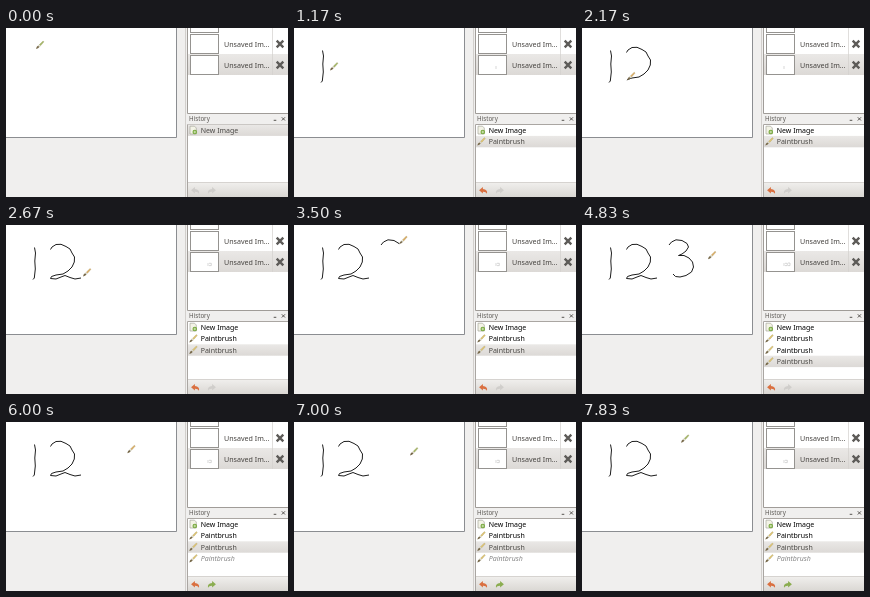
Recreate the animation shown at these times as an HTML page. Size 282 by 169 pixels, loop 8000 ms.

```html
<!DOCTYPE html>
<html lang="en">
<head>
<meta charset="utf-8">
<title>Paint history</title>
<style>
  html, body { margin: 0; width: 100%; height: 100%; overflow: hidden; background: #f0efee; }
  svg { display: block; width: 100%; height: 100%; }
  text { font-family: "Noto Sans", "Open Sans", sans-serif; font-size: 7px; font-weight: 500; }
  .stroke { fill: none; stroke: #1c1c1c; stroke-width: 1; stroke-linejoin: round; }
  .mini { fill: none; stroke: #bdbdbd; stroke-width: .6; }
  .title { font-size: 6.2px; fill: #5c5955; }
  .file { font-size: 7.1px; fill: #45423f; }
  .thumb { fill: #fff; stroke: #959390; stroke-width: 1; }
  .cross { stroke: #5d5b58; stroke-width: 2.4; fill: none; }
  .current { fill: #4a4845; }
  .undone { font-style: italic; fill: #878787; }
</style>
</head>
<body>
<svg viewBox="0 0 282 169">
  <defs>
    <linearGradient id="sel" x2="0" y2="1">
      <stop stop-color="#eae8e6"/><stop offset="1" stop-color="#dcd9d6"/>
    </linearGradient>
    <linearGradient id="bar" x2="0" y2="1">
      <stop stop-color="#f1f0ee"/><stop offset="1" stop-color="#dad7d3"/>
    </linearGradient>
    <g id="brush">
      <path d="M3.2 -4.2L7 -8L8 -7.2L4.5 -3.2Z" fill="currentColor" stroke="#99916a" stroke-width=".3"/>
      <path d="M2.5 -4.2L4.5 -2.7L3.4 -1.7L1.8 -3.3Z" fill="#d8d6c6"/>
      <path d="M0 0Q.6 -2.6 2 -3.2L3.4 -2Q2.4 -.3 0 0Z" fill="#77694a"/>
    </g>
    <path id="arrow" d="M-4.4 -.8L-.6 -4V-2.1Q4.4 -1.8 3.5 2.8Q2.5 .6 -.6 .7V2.5Z"/>
    <path id="cross" class="cross" d="M-3.3 -3.3L3.3 3.3M3.3 -3.3L-3.3 3.3"/>
  </defs>

  <rect width="282" height="169" fill="#f0efee"/>
  <rect width="170" height="109" fill="#fff"/>
  <path d="M0 109.5H170.5V0" fill="none" stroke="#8b8d91"/>

  <path d="M179.5 0V169" stroke="#d2cfcc"/>
  <rect x="181" width="101" height="85" fill="#fff"/>
  <rect x="181" y="26" width="101" height="21" fill="url(#sel)"/>
  <path d="M181.5 0V85.5H282" fill="none" stroke="#a09c98"/>
  <path d="M266.5 0V47" stroke="#d3d0cd" stroke-width=".7"/>
  <rect class="thumb" x="184.5" y="-15.5" width="28" height="20"/>
  <rect class="thumb" x="184.5" y="6.5" width="28" height="19"/>
  <rect class="thumb" x="184.5" y="27.5" width="28" height="19"/>
  <text class="file" x="218" y="18.5">Unsaved Im…</text>
  <text class="file" x="218" y="39.5">Unsaved Im…</text>
  <use href="#cross" x="274" y="16"/>
  <use href="#cross" x="274" y="37"/>
  <path class="mini" d="M202 38V41"/>
  <path class="mini" d="M203 38.3H205.3V40.6H203"/>
  <path class="mini" d="M206 38H208V40.6H206"/>

  <text class="title" x="183" y="93.2">History</text>
  <path d="M267.7 92.3H270.3" stroke="#56534f"/>
  <path d="M275.8 89.3L279 92.5M279 89.3L275.8 92.5" stroke="#56534f"/>
  <rect x="181" y="96" width="101" height="58" fill="#fff"/>
  <rect x="181" y="154" width="101" height="15" fill="url(#bar)"/>
  <path d="M282 96.5H181.5V169" fill="none" stroke="#aaa6a2"/>
  <path d="M182 154.5H282" stroke="#d6d3d0"/>
  <rect id="selected" x="182" width="100" height="11.4" fill="url(#sel)"/>
  <g id="rows"></g>
  <use id="undo" href="#arrow" x="189.5" y="163"/>
  <use id="redo" href="#arrow" transform="translate(205.5 163) scale(-1 1)"/>

  <g id="ink"></g>
  <use id="cursor" href="#brush"/>
</svg>
<script>
const LOOP = 8000, STEP = 1000 / 6;
const NS = 'http://www.w3.org/2000/svg';
const $ = id => document.getElementById(id);

function add(parent, tag, attrs, text = '') {
  const el = document.createElementNS(NS, tag);
  for (const k in attrs) el.setAttribute(k, attrs[k]);
  el.textContent = text;
  parent.append(el);
  return el;
}

// Each stroke is drawn between two steps and committed to the history at `done`.
const strokes = [
  { start: 3, end: 6, done: 7,
    d: 'M28.5 22.5L29.5 28L28.8 36L29.3 44L28.3 53L27 54.5' },
  { start: 9, end: 15, done: 16,
    d: 'M44.5 24.5L46 22L50 19.5L55 19.3L60 21.5L64 24L66 28L68.5 32L68.3 37L66 42L62 46L57 49L50 50L45.5 51.5L44.5 53.5L50 54L55 52L59 50.5L64 52.5L69 54L75 53' },
  { start: 19, end: 27, done: 28,
    d: 'M87 20L89.5 17L94 14.8L100 15.5L105 18.5L106.5 22L104 26L100 29L96.5 30.5L102 30.5L107 33L110.5 37L111.5 42L109.5 47L104 50.5L98 52L93.5 51.5L91 49' }
];
for (const s of strokes) {
  s.el = add($('ink'), 'path', { d: s.d, class: 'stroke' });
  s.len = s.el.getTotalLength();
}

// Brush positions while no stroke is being drawn: step, x, y.
const hover = [
  [0, 30, 21], [2, 30, 21], [3, 28.5, 22.5], [6, 27, 54.5], [7, 36, 42.5], [9, 44.5, 24.5],
  [15, 75, 53], [16, 77, 51.5], [17, 81, 40], [19, 87, 20], [27, 91, 49],
  [28, 110, 41], [29, 126, 34.3], [30, 126, 33], [33, 121.3, 31.2], [36, 121.3, 31.2],
  [42, 116, 33.5], [47, 99, 20.7]
];

const rowY = i => 102.2 + 11.4 * i;
const rows = ['New Image', 'Paintbrush', 'Paintbrush', 'Paintbrush'].map((name, i) => {
  const g = add($('rows'), 'g', {}), y = rowY(i);
  if (i) add(g, 'use', { href: '#brush', x: 183.3, y: y + 4, color: '#e2c670' });
  else {
    add(g, 'path', { d: 'M184 98.2H188.5L190.3 100V106H184Z', fill: '#f3f3e6', stroke: '#a8a89c', 'stroke-width': .7 });
    add(g, 'circle', { cx: 188.8, cy: 104, r: 2.3, fill: '#76a83c' });
    add(g, 'path', { d: 'M187.5 104H190.1M188.8 102.7V105.3', stroke: '#e9f3d6', 'stroke-width': .7 });
  }
  add(g, 'text', { x: 194.7, y: y + 2.5 }, name);
  return g;
});
const minis = document.querySelectorAll('.mini');
const show = (el, on) => el.setAttribute('visibility', on ? 'visible' : 'hidden');
const clamp = v => Math.max(0, Math.min(1, v));

function hoverAt(n) {
  const i = Math.max(1, hover.findIndex(p => p[0] >= n));
  const [a, x, y] = hover[i - 1], [b, u, v] = hover[i];
  const k = (n - a) / (b - a);
  return { x: x + (u - x) * k, y: y + (v - y) * k };
}

function render(t) {
  const n = Math.min(47, Math.floor((t + 8) / STEP));
  const undone = n >= 36;
  const count = strokes.filter(s => n >= s.done).length;
  const current = undone ? 2 : count;
  let tip = hoverAt(n);

  strokes.forEach((s, i) => {
    const len = s.len * clamp((n - s.start) / (s.end - s.start));
    s.el.setAttribute('stroke-dasharray', len + ' 999');
    show(s.el, len > 0 && !(undone && i === 2));
    if (n >= s.start && n <= s.end) tip = s.el.getPointAtLength(len);
    show(minis[i], i < current);
  });

  rows.forEach((g, i) => {
    show(g, i <= count);
    g.lastChild.setAttribute('class', i > current ? 'undone' : i === current ? 'current' : '');
  });
  $('selected').setAttribute('y', rowY(current) - 5.7);
  $('undo').setAttribute('fill', current ? '#da7040' : '#d0cecb');
  $('redo').setAttribute('fill', undone ? '#8bad50' : '#d0cecb');
  $('cursor').setAttribute('transform', `translate(${tip.x} ${tip.y})`);
  $('cursor').setAttribute('color', n < 10 || n > 41 ? '#a3b964' : '#dfae62');
}

const begin = performance.now();
function tick() {
  render((performance.now() - begin) % LOOP);
  requestAnimationFrame(tick);
}
tick();
</script>
</body>
</html>
```
